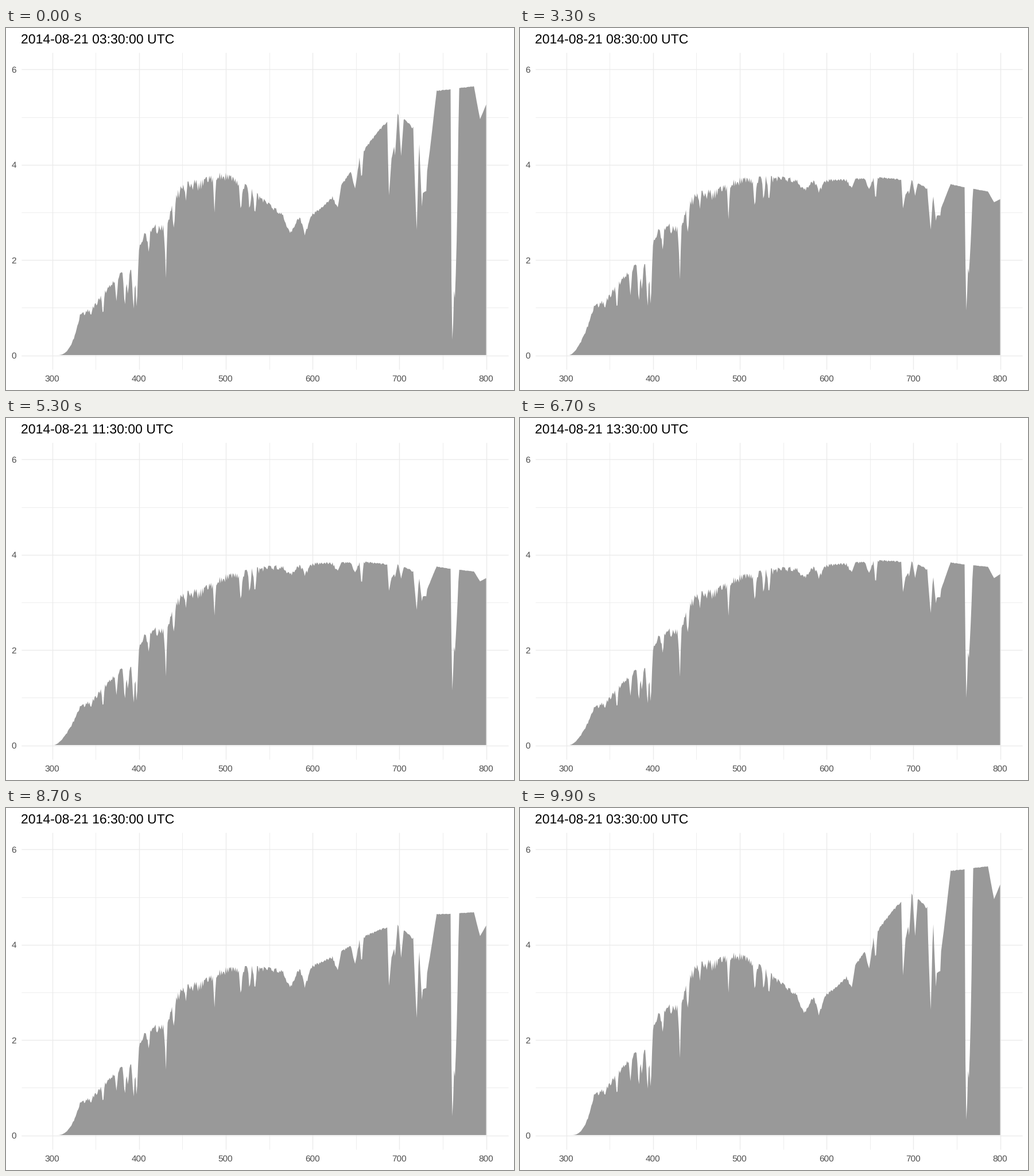
Write a matplotlib script that moves like this. It is 885 px wide and 632 px high and loops after 10000 ms.

```python
import math

import numpy as np
import matplotlib.pyplot as plt
from matplotlib.animation import FuncAnimation

WIDTH, HEIGHT, DPI = 885, 632, 100
FRAMES, INTERVAL = 100, 100
PX = 72 / DPI

# Frame at which each hourly spectrum has settled; the last one closes the loop.
SETTLED = [0, 6, 13, 20, 27, 34, 41, 48, 54, 61, 68, 75, 81, 87, 93, 99]
LAST_TWEENED = 11

# Sunlight without absorption: (nm, level)
CONTINUUM = [
    (290, .86), (332, .88), (345, 1.02), (367, 1.48), (379, 1.7), (397, 1.75),
    (402, 2.38), (417, 2.6), (430, 2.55), (437, 2.97), (452, 3.42), (470, 3.38),
    (496, 3.66), (532, 3.72), (584, 3.66), (622, 3.73), (662, 3.86), (685, 3.86),
    (712, 3.95), (754, 3.8), (800, 3.69),
]
# Strongest solar lines: centre nm -> depth
SOLAR_LINES = {345: .15, 358.5: .32, 374: .3, 383.6: .45, 387: .25, 393.7: .5,
               397.4: .5, 411: .16, 431: .38, 440: .18, 454: .12, 487: .18,
               517.5: .18, 527.5: .14, 533.5: .16, 656.5: .14}
LINE_WIDTH = 2.2
# Bands of the air: (peak nm, blue width, red width, optical depth)
AIR_BANDS = [
    (574, 9, 9, .07), (591, 5, 8, .07), (629, 6, 4, .06), (649, 5, 5, .07),
    (688, 2, 6, .205), (695, 4, 3, .105), (702, 3, 3, .095), (715, 20, 25, .07),
    (720, 4, 3, .33), (726, 4, 6, .26), (731, 4, 12, .18), (761, 2, 2, 1.35),
    (763.5, 3, 5, .9), (793, 7, 16, .07),
]
# Hours after 03:30 -> level, red tilt, ozone, ultraviolet gain, air path
SKY = {
    0: (.09, .32, .456, 0, 1.9),
    1: (.035, .12, .17, 0, 1.35),
    2: (0, 0, 0, 0, 1),
    4.5: (.028, -.107, -.022, .085, .88),
    7.5: (-.039, .017, -.07, -.02, .78),
    11: (-.044, .068, -.037, -.04, .98),
    12: (-.05, .14, .01, -.05, 1.2),
    13: (-.062, .285, .1, -.07, 1.64),
    14: (-.13, .61, .35, -.12, 2.1),
}

wavelength = np.arange(290, 801)


def peak(centre, blue, red):
    return np.interp(wavelength, [centre - blue, centre, centre + red], [0, 1, 0])


sunlight = np.interp(wavelength, *zip(*CONTINUUM))
for centre, depth in SOLAR_LINES.items():
    sunlight *= 1 - depth * peak(centre, LINE_WIDTH, LINE_WIDTH)
# Many faint lines, fading towards the red
faint = np.random.default_rng(4).random(wavelength.size) ** 2
sunlight *= 1 - .1 * np.exp(-((wavelength - 300) / 240) ** 2) * faint

air_depth = sum(depth * peak(centre, blue, red) for centre, blue, red, depth in AIR_BANDS)
ozone_band = np.exp(-((wavelength - 590) / 51) ** 2 / 2)
redness = (wavelength - 450) / 330
violet = np.clip(450 - wavelength, 0, 120) / 100


def spectrum(hour):
    level, tilt, ozone, uv, path = (np.interp(hour, list(SKY), c) for c in zip(*SKY.values()))
    edge = min(306, 291 + 14 * path)
    ramp = np.clip((wavelength - edge) / (332 - edge), 0, 1) ** (.9 + .9 * path)
    gain = level + tilt * redness + uv * violet - ozone * ozone_band
    return sunlight * ramp * np.exp(gain - path * air_depth)


def to_x(nm):
    return 80.5 + (nm - 300) * 1.512


def to_y(level):
    return 571 - level * 83.2


def hour_at(frame):
    state = sum(frame >= start for start in SETTLED) - 1
    if state < LAST_TWEENED and frame == SETTLED[state + 1] - 1:
        return state + .5
    return state % (len(SETTLED) - 1)


plt.rcParams.update({"font.family": "Liberation Sans", "text.hinting": "none"})
fig = plt.figure(figsize=(WIDTH / DPI, HEIGHT / DPI), dpi=DPI, facecolor="white")
ax = fig.add_axes([0, 0, 1, 1])
ax.set(xlim=(0, WIDTH), ylim=(HEIGHT, 0))
ax.axis("off")


def grid(xs, ys, width):
    style = dict(color="#EBEBEB", lw=width * PX, solid_capstyle="butt", zorder=1)
    for nm in xs:
        ax.plot([to_x(nm)] * 2, [43, 596], **style)
    for level in ys:
        ax.plot([27, 875], [to_y(level) + .5] * 2, **style)


grid(range(350, 800, 100), (1, 3, 5), .9)
grid(range(300, 801, 100), (0, 2, 4, 6), 1.4)

label = dict(size=15.4 * PX, color="#4D4D4D", va="baseline")
for nm in range(300, 801, 100):
    ax.text(to_x(nm) - .5, 617, str(nm), ha="center", **label)
for level in (0, 2, 4, 6):
    ax.text(18, to_y(level) + 6, str(level), ha="right", **label)
title = ax.text(26.5, 27, "", size=23 * PX, color="black", va="baseline")

area, = ax.fill([0], [0], color="#999999", lw=0, zorder=2)
xs = to_x(wavelength)
outline_x = np.concatenate([xs, [xs[-1], xs[0]]])


def update(frame):
    hour = hour_at(frame)
    ys = to_y(np.append(spectrum(hour), [0, 0]))
    area.set_xy(np.column_stack([outline_x, ys]))
    title.set_text(f"2014-08-21 {3 + math.ceil(hour):02d}:30:00 UTC")
    return area, title


anim = FuncAnimation(fig, update, frames=FRAMES, interval=INTERVAL,
                     repeat=True, repeat_delay=0)
plt.show()
```
